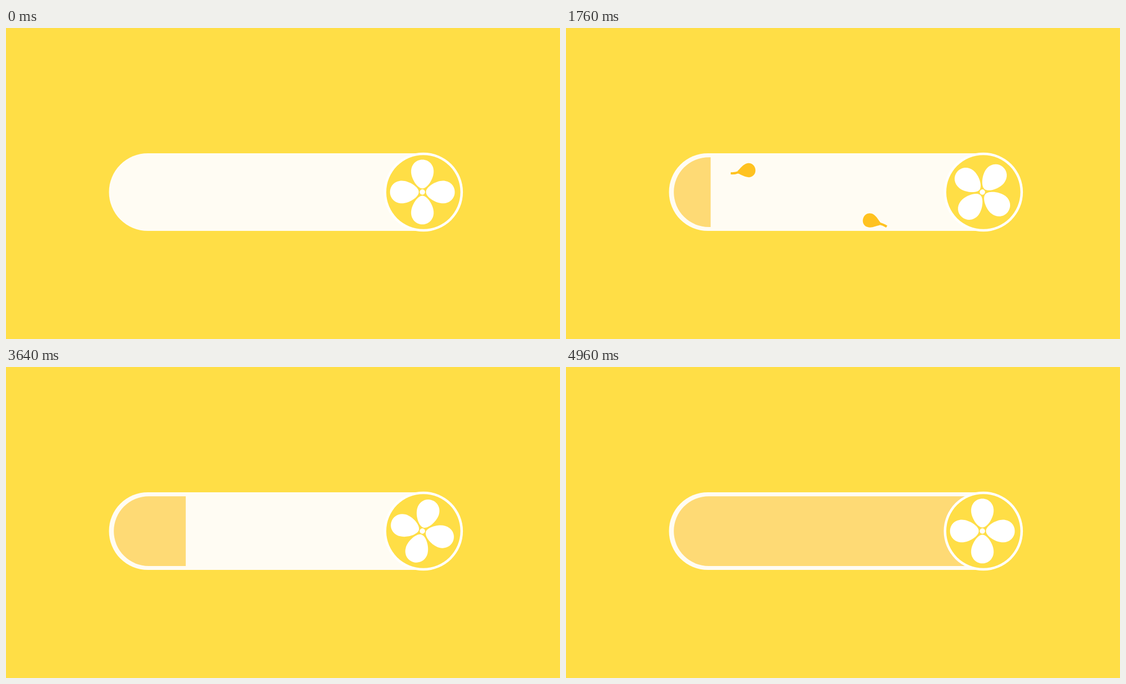
Write an HTML page with a canvas that moves like this. It is 998 px wide and 561 px high and loops after 5 s.

```html
<!DOCTYPE html>
<html lang="en">
<head>
<meta charset="utf-8">
<title>Leaf loader</title>
<style>
  html, body { margin: 0; width: 100%; height: 100%; overflow: hidden; background: #ffde46; }
  canvas { display: block; }
</style>
</head>
<body>
<canvas id="stage" width="998" height="561"></canvas>
<script>
const ctx = document.getElementById('stage').getContext('2d');
const LOOP = 5000, STEP = 40, FLIGHT = 780;
const YELLOW = '#ffde46', CREAM = '#fffcf3', FILL = '#feda75', LEAF = '#ffc220', WHITE = '#fff';
const LAUNCHES = [8, 375, 470, 730, 970, 1025, 1201, 1560, 2290, 2708, 2793];
const LAST_LAUNCH = 3953;

const ramp = (t, from, to) => Math.min(1, Math.max(0, (t - from) / (to - from)));

// The fan makes three turns, then two, then three faster ones
const fanTurns = t => 3 * ramp(t, 0, 2240) + 2 * ramp(t, 2240, 3800) + 3 * ramp(t, 3800, 4960);

// Steady filling, a slow ease-out, then a quick linear finish
function fillEdge(t) {
  if (t <= 2240) return 296.8 - 0.0755 * (2240 - t);
  const rest = 1 - ramp(t, 2240, 3560);
  return Math.max(296.8 + 27 * (1 - rest * rest), 403.2 + 0.458 * (t - 3920));
}

function disc(x, y, r, color) {
  ctx.fillStyle = color;
  ctx.beginPath();
  ctx.arc(x, y, r, 0, Math.PI * 2);
  ctx.fill();
}

function capsule(left, top, bottom) {
  const r = (bottom - top) / 2;
  ctx.beginPath();
  ctx.moveTo(752, top);
  ctx.lineTo(left + r, top);
  ctx.arc(left + r, top + r, r, -Math.PI / 2, Math.PI / 2, true);
  ctx.lineTo(752, bottom);
  ctx.closePath();
}

// Egg along the x axis: narrow at neck, widest at belly, round at end
function egg(neck, neckWidth, handleX, handleY, shoulder, belly, r, end) {
  const round = belly + 0.57 * (end - belly);
  ctx.beginPath();
  ctx.moveTo(neck, -neckWidth);
  ctx.bezierCurveTo(handleX, -handleY, shoulder, -r, belly, -r);
  ctx.bezierCurveTo(round, -r, end, -0.57 * r, end, 0);
  ctx.bezierCurveTo(end, 0.57 * r, round, r, belly, r);
  ctx.bezierCurveTo(shoulder, r, handleX, handleY, neck, neckWidth);
  ctx.fill();
}

function drawLeaf(age, phase) {
  if (age < 0 || age > FLIGHT) return;
  const x = 705 - 500 * (age / FLIGHT) ** 0.85;
  const wave = (x - 570) / 66;
  ctx.save();
  ctx.translate(x, 300 + 50 * Math.cos(wave - phase));
  ctx.rotate(-0.83 * wave - 0.17 * Math.sin(wave) - 0.1 * phase);
  ctx.fillStyle = ctx.strokeStyle = LEAF;
  egg(19, 2.5, 13, 6, 7, -1, 12.7, -13);
  ctx.lineWidth = 4;
  ctx.beginPath();
  ctx.moveTo(16, 0);
  ctx.quadraticCurveTo(24, -1.5, 32, 0.5);
  ctx.stroke();
  ctx.restore();
}

function drawFan(t) {
  disc(751.8, 296, 71.3, WHITE);
  disc(751.8, 296, 66.8, YELLOW);
  ctx.save();
  ctx.translate(750.1, 295.9);
  ctx.rotate(fanTurns(t) * Math.PI * 2);
  ctx.fillStyle = WHITE;
  for (let i = 0; i < 4; i++) {
    egg(6.5, 0, 6.5, 9, 24, 37, 20.3, 58.3);
    ctx.rotate(Math.PI / 2);
  }
  disc(0, 0, 4.8, WHITE);
  ctx.restore();
}

function draw(t) {
  ctx.fillStyle = YELLOW;
  ctx.fillRect(0, 0, 998, 561);

  capsule(185.5, 226, 366);
  ctx.fillStyle = CREAM;
  ctx.fill();
  ctx.save();
  ctx.clip();
  LAUNCHES.forEach(launch => drawLeaf(t - launch, 0));
  drawLeaf(t - LAST_LAUNCH, 1.5);
  ctx.restore();

  const edge = Math.min(fillEdge(t), 752);
  if (edge > 194) {
    ctx.save();
    ctx.beginPath();
    ctx.rect(190, 226, edge - 190, 140);
    ctx.clip();
    capsule(194.2, 233.2, 359);
    ctx.fillStyle = FILL;
    ctx.fill();
    ctx.restore();
  }
  drawFan(t);
}

const start = performance.now();
function tick() {
  const t = (performance.now() - start) % LOOP;
  draw(Math.floor(t / STEP) * STEP);
  requestAnimationFrame(tick);
}
tick();
</script>
</body>
</html>
```
